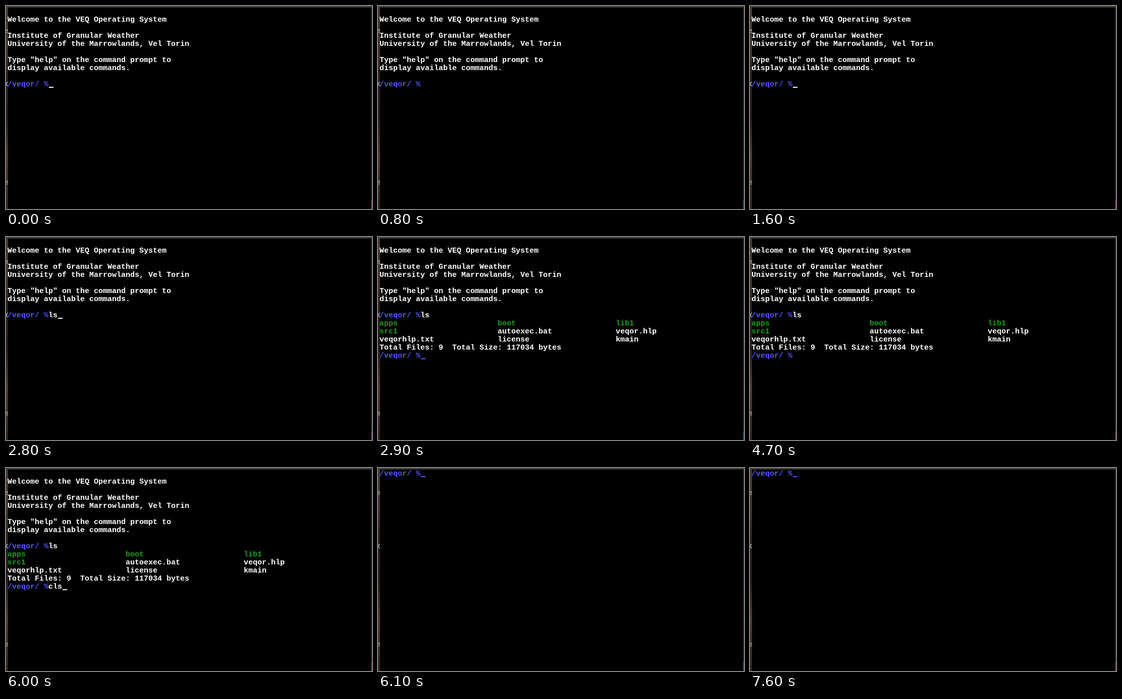
Recreate the animation shown at these times as an HTML page. Size 725x402 px, loop 8000 ms.

```html
<!DOCTYPE html>
<html lang="en">
<head>
<meta charset="utf-8">
<title>Terminal session</title>
<style>
  html, body { margin: 0; width: 100%; height: 100%; overflow: hidden; background: #000; }
  svg { display: block; width: 725px; height: 402px; }
  .term text { font: bold 15px "Liberation Mono", monospace; white-space: pre; }
  .label { font: 13px "Noto Sans", sans-serif; fill: #b4cfd3; }
</style>
</head>
<body>
<svg viewBox="0 0 725 402">
  <defs>
    <linearGradient id="wall" x1="0" y1="0" x2="0" y2="1">
      <stop offset="0" stop-color="#463a33"/>
      <stop offset=".2" stop-color="#46342e"/>
      <stop offset=".36" stop-color="#2c1f1c"/>
      <stop offset=".55" stop-color="#251c1b"/>
      <stop offset=".74" stop-color="#543c33"/>
      <stop offset="1" stop-color="#30231f"/>
    </linearGradient>
  </defs>
  <!-- desktop showing around the window -->
  <rect width="725" height="402" fill="url(#wall)"/>
  <rect width="725" height="3" fill="#3c3d35"/>
  <rect x="724" y="3" width="1" height="382" fill="#59483f"/>
  <rect x="724" y="385" width="1" height="17" fill="#1fb0aa"/>
  <text class="label" x="-.5" y="53">s</text>
  <text class="label" x="-.5" y="159">C</text>
  <text class="label" x="-.5" y="353">s</text>
  <rect x="4" y="3" width="720" height="399" fill="#000"/>
  <g class="term">
    <g id="intro"></g>
    <g id="listing"></g>
    <g id="cleared"></g>
    <text id="input" fill="#fff"></text>
    <rect id="cursor" width="9" height="2"/>
  </g>
</svg>
<script>
const WHITE = '#fff', BLUE = '#55f', GREEN = '#18a018';
const LOOP = 8000, PROMPT = '/veqor/ %';
const PROMPT_ROWS = [9, 14, 0];
const $ = id => document.getElementById(id);
const colX = col => 4 + col * 9;
const rowY = row => 3 + row * 16;

// Glyphs sit one pixel left of their cell, on a baseline 12 pixels down.
function place(node, row, col) {
  node.setAttribute('x', colX(col) - 1);
  node.setAttribute('y', rowY(row) + 12);
}

function put(group, row, col, string, color = WHITE) {
  const node = document.createElementNS($(group).namespaceURI, 'text');
  place(node, row, col);
  node.setAttribute('fill', color);
  node.textContent = string;
  $(group).append(node);
}

put('intro', 1, 0, 'Welcome to the VEQ Operating System');
put('intro', 3, 0, 'Institute of Granular Weather');
put('intro', 4, 0, 'University of the Marrowlands, Vel Torin');
put('intro', 6, 0, 'Type "help" on the command prompt to');
put('intro', 7, 0, 'display available commands.');
put('intro', 9, 0, PROMPT, BLUE);

put('listing', 9, 9, 'ls');
['apps', 'boot', 'lib1', 'src1', 'autoexec.bat', 'veqor.hlp',
 'veqorhlp.txt', 'license', 'kmain'].forEach((name, i) =>
  put('listing', 10 + Math.floor(i / 3), i % 3 * 26, name, i < 4 ? GREEN : WHITE));
put('listing', 13, 0, 'Total Files: 9  Total Size: 117034 bytes');
put('listing', 14, 0, PROMPT, BLUE);

put('cleared', 0, 0, PROMPT, BLUE);

// [start ms, screen, typed text], where a trailing _ means the cursor is lit
const steps = [
  [0, 0, '_'], [300, 0, ''], [600, 0, '_'], [800, 0, ''], [1100, 0, '_'],
  [1400, 0, ''], [1600, 0, '_'], [1900, 0, ''], [2000, 0, 'l'],
  [2200, 0, 'ls_'], [2500, 0, 'ls'], [2800, 0, 'ls_'],
  [2900, 1, '_'], [3100, 1, ''], [3300, 1, '_'], [3600, 1, ''], [3900, 1, '_'],
  [4200, 1, ''], [4400, 1, '_'], [4700, 1, ''], [4900, 1, 'c_'], [5200, 1, 'c'],
  [5300, 1, 'cl'], [5500, 1, 'cl_'], [5600, 1, 'cls_'], [5700, 1, 'cls'], [6000, 1, 'cls_'],
  [6100, 2, '_'], [6300, 2, ''], [6600, 2, '_'], [6800, 2, ''],
  [7100, 2, '_'], [7400, 2, ''], [7600, 2, '_']
];

const show = (id, on) => $(id).setAttribute('visibility', on ? 'visible' : 'hidden');
let current;

function render(time) {
  const step = steps.findLast(([start]) => start <= time);
  if (step === current) return;
  current = step;
  const [, screen, line] = step;
  const typed = line.replace('_', '');
  const row = PROMPT_ROWS[screen];
  show('intro', screen < 2);
  show('listing', screen === 1);
  show('cleared', screen === 2);
  place($('input'), row, PROMPT.length);
  $('input').textContent = typed;
  $('cursor').setAttribute('x', colX(PROMPT.length + typed.length));
  $('cursor').setAttribute('y', rowY(row) + 13);
  $('cursor').setAttribute('fill', screen === 0 || typed ? WHITE : BLUE);
  show('cursor', line.endsWith('_'));
}

const origin = performance.now();
function tick() {
  render((performance.now() - origin) % LOOP);
  requestAnimationFrame(tick);
}
tick();
</script>
</body>
</html>
```
